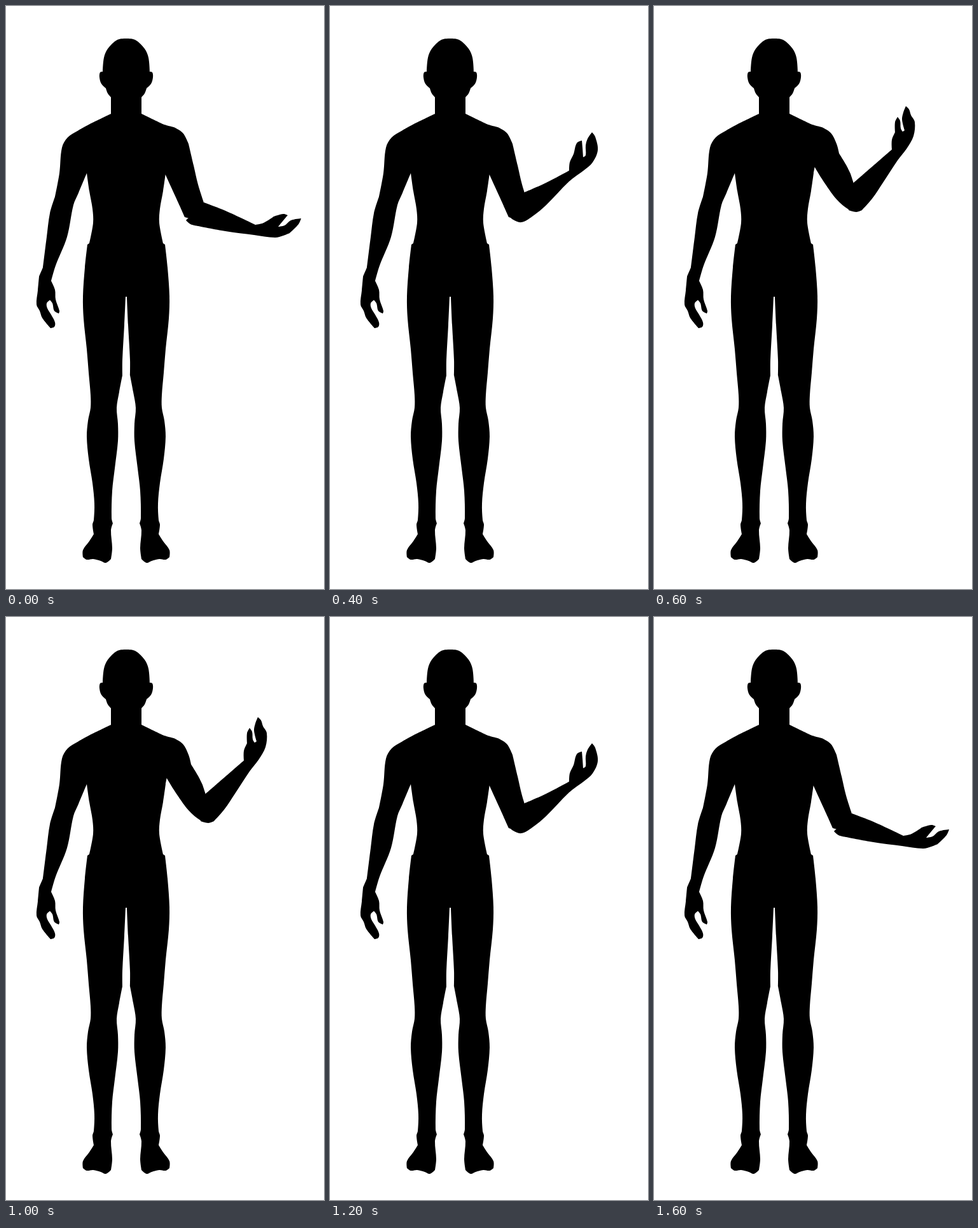
Animation, 500 px wide and 914 px high, one loop 1800 ms. Source, as an HTML page with a canvas:

```html
<!DOCTYPE html>
<html lang="en">
<head>
<meta charset="utf-8">
<title>Arm raise</title>
<style>
  html, body { margin: 0; width: 100%; height: 100%; overflow: hidden; background: #fff; }
  canvas { display: block; width: 100vw; height: 100vh; }
</style>
</head>
<body>
<canvas width="500" height="914"></canvas>
<script>
  const STEP = 200, STEPS = 9;
  const ctx = document.querySelector('canvas').getContext('2d');

  // Closed smooth outline through "x,y" points; "*" marks a sharp corner.
  function outline(text) {
    const points = text.split(' ').map(item => {
      const [x, y] = item.split(',').map(parseFloat);
      return { x, y, sharp: item.endsWith('*') };
    });
    const at = i => points[(i + points.length) % points.length];
    const handle = (i, length) => {
      const p = at(i), a = at(i - 1), b = at(i + 1);
      const k = p.sharp ? 0 : length / Math.hypot(b.x - a.x, b.y - a.y);
      return [p.x + (b.x - a.x) * k, p.y + (b.y - a.y) * k];
    };
    const path = new Path2D();
    path.moveTo(points[0].x, points[0].y);
    points.forEach((p, i) => {
      const q = at(i + 1);
      const reach = Math.hypot(q.x - p.x, q.y - p.y) / 3;
      path.bezierCurveTo(...handle(i, reach), ...handle(i + 1, -reach), q.x, q.y);
    });
    path.closePath();
    return path;
  }

  const halfBody = outline('190,51* 175,53 160,67 154,81 152,103* 148,104 147,112 150,122 157,129* 160,137 165,143* 165,169* 130,186 114,195* 127,262* 131,290 136,318 137,340 131,372* 128,374* 124,410 121,455 122,490 127,538 130,575 133,610 133,630 129,650 127,675 130,710 136,748 139,780 138,806 136,813 138,828* 131,839 121,853 121,864* 127,868 137,867 149,870 157,873 165,867* 167,850 165,822 168,811* 166,803 167,760 171,725 176,682 176,655 174,630 178,605 183,579* 183,555 186,500 188,456* 190,455*');
  const restingArm = outline('140,182* 114,195 97,206 88,222 84,262 77,299* 69,325 64,362 58,410* 52,424* 50,446 48,468 53,478 57,489 70,505* 76,503 77,496 71,484 65,474 64,466 69,461* 73,466 76,478 83,482* 84,478 78,460 77,445 71,431* 78,407 96,362 106,312 114,293 127,262* 150,230*');

  const upperLow = outline('213,169* 240,183 264,190* 278,199 287,216* 295,250 302,280 311,308* 300,336* 281,331* 273,313* 251,265* 235,240*');
  const upperHigh = outline('213,169* 240,183 264,190* 278,199 287,216 291,231* 302,249 309,263* 314,278* 325,318* 318,322 306,319 287,303 270,280* 264,271 253,253* 235,240*');
  const elbow = outline('306,300* 273,313* 283,336 296,346 306,345 330,328*');

  const foreLow = outline('311,308* 345,321 392,343* 405,340 421,330* 436,326 443,328* 437,335 428,346* 438,344 448,336 464,333* 460,342 446,356* 436,360 423,363 390,359 345,353 302,345* 290,342 283,336*');
  const foreMid = outline('306,292* 340,277 376,258* 377,245 383,232 388,215 396,211* 397,222 398,237* 402,234 402,219 405,208 412,198* 417,205 421,226 413,245 400,257 376,275 340,312 318,330 301,339 288,335 280,328* 273,313*');
  const foreHigh = outline('314,277* 344,251 374,225* 374,210 379,198* 379,182 383,174* 387,180 388,192 391,197* 394,195* 390,178 392,167 396,157* 401,162 404,171 410,182 408,204 397,224 383,242 360,277 343,302 327,320* 318,323 306,320*');

  const fill = (...paths) => paths.forEach(path => ctx.fill(path));

  function fillTurned(path, degrees, x, y, dx = 0, dy = 0) {
    ctx.save();
    ctx.translate(x + dx, y + dy);
    ctx.rotate(degrees * Math.PI / 180);
    ctx.translate(-x, -y);
    ctx.fill(path);
    ctx.restore();
  }

  function drawBody() {
    fill(halfBody, restingArm);
    ctx.save();
    ctx.translate(378, 0);
    ctx.scale(-1, 1);
    fill(halfBody);
    ctx.restore();
  }

  // Arm poses, lowest first
  const poses = [
    () => fill(upperLow, foreLow),
    () => { fill(upperLow, elbow); fillTurned(foreLow, -27, 295, 326, 4, -3); },
    () => fill(upperLow, foreMid),
    () => fill(upperHigh, foreHigh),
    () => { fill(upperHigh); fillTurned(foreHigh, -20, 318, 303); },
  ];

  const start = performance.now();
  function draw() {
    const step = Math.floor((performance.now() - start) / STEP) % STEPS;
    ctx.clearRect(0, 0, 500, 914);
    drawBody();
    poses[Math.min(step, STEPS - 1 - step)]();
    requestAnimationFrame(draw);
  }
  draw();
</script>
</body>
</html>
```
